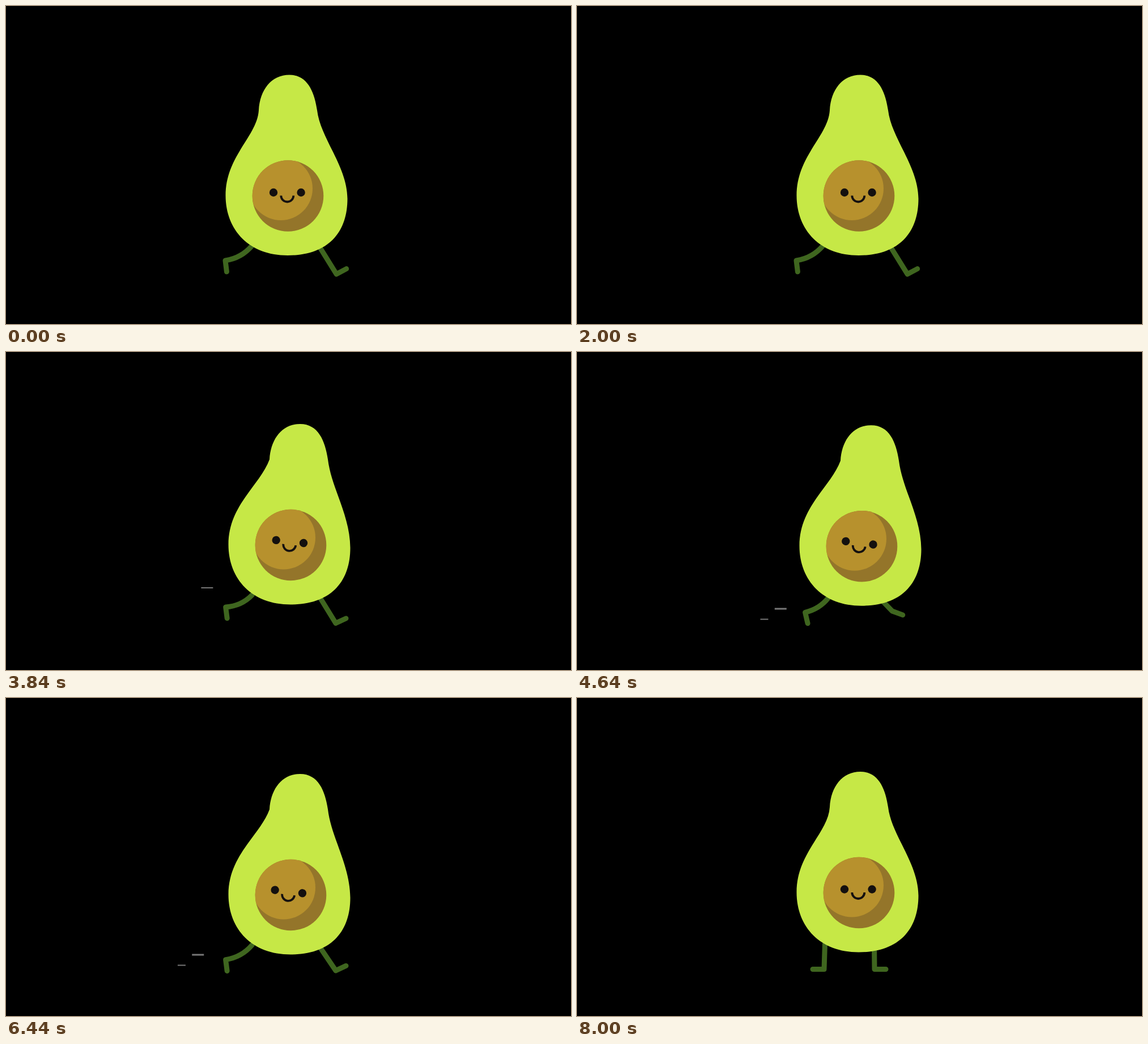
Write an HTML page that moves like this. It is 997x561 px and loops after 8040 ms.

```html
<!DOCTYPE html>
<html lang="en">
<head>
<meta charset="utf-8">
<title>Running avocado</title>
<style>
  html, body { margin: 0; width: 100%; height: 100%; overflow: hidden; background: #000; }
  svg { display: block; width: 100vw; height: 100vh; }
  .leg { fill: none; stroke: #3f661f; stroke-width: 9; stroke-linecap: round; stroke-linejoin: round; }
  .dash { stroke: #777; }
</style>
</head>
<body>
<svg viewBox="0 0 997 561">
  <defs>
    <clipPath id="seedClip"><circle cx="497.5" cy="335" r="62.8"/></clipPath>
  </defs>
  <line class="dash" stroke-width="2"/>
  <line class="dash" stroke-width="3"/>
  <line class="dash" stroke-width="2"/>
  <g id="avocado">
    <path class="leg"/>
    <path class="leg"/>
    <path id="body" fill="#c6e846"/>
    <g id="seed">
      <circle cx="497.5" cy="335" r="62.8" fill="#94752a"/>
      <circle cx="485" cy="322" r="56" fill="#b7912d" clip-path="url(#seedClip)"/>
      <g id="face" fill="#14100f">
        <circle cx="-24.3" r="7.2"/>
        <circle cx="24.3" r="7.2"/>
        <path d="M-11 5.5A11 11 0 0 0 11 5.5" fill="none" stroke="#14100f" stroke-width="3.8"/>
      </g>
    </g>
  </g>
</svg>
<script>
const LOOP = 8040, FRAME = 40;
const HOP = 500, HOP_LEAD = 32;
const RUN_START = 2968, RUN_END = 7960;
const STRIDE = 14000 / 24, REACH_AT = 5869;
const BOB = 1000 / 3, LOW_AT = 3063;

// Speed lines: y, length, start within a stride
const DASHES = [[416, 21, -.28], [453, 21, .11], [471.5, 14, -.01]];

const $ = s => document.querySelector(s);
const legs = document.querySelectorAll('.leg');
const dashes = document.querySelectorAll('.dash');
const avocado = $('#avocado'), body = $('#body'), seed = $('#seed'), face = $('#face');

const { PI, sin, cos, max, min } = Math;
const mod = (a, n) => ((a % n) + n) % n;
const clamp = x => max(0, min(1, x));
const smooth = x => x * x * (3 - 2 * x);
const mix = (a, b, k) => a.map((v, i) => v + (b[i] - v) * k);

// A leg is hip x y, heel x y, foot angle, bend.
const standLeg = side => [
  481 + 43.5 * side, 425, 480.5 + 44.5 * side, 470, 90 - 90 * side, 0
];

// Angle 0 reaches furthest forward, PI furthest back.
function strideLeg(angle) {
  const c = cos(angle), s = sin(angle);
  const sway = c - .15 * s * s;
  const lift = 34 * max(0, -s);
  return [
    493 + 59 * sway, 434 - 11 * sway * sway,
    485 + 98 * sway, 461 + 12 * c - lift,
    55 - 28 * c - 55 * max(0, c) ** 6,
    -10 * max(0, -sway)
  ];
}

function legPath([hx, hy, ax, ay, angle, bend]) {
  const dx = ax - hx, dy = ay - hy, len = Math.hypot(dx, dy) || 1;
  const cx = (hx + ax) / 2 - dy / len * bend;
  const cy = (hy + ay) / 2 + dx / len * bend;
  const turn = angle * PI / 180;
  return `M${hx} ${hy}Q${cx} ${cy} ${ax} ${ay}l${20 * cos(turn)} ${20 * sin(turn)}`;
}

// Leaning pushes the head further than the belly
function bodyPath(lean) {
  const h = (x, y) => `${x + 19 * lean} ${y} `;
  const b = (x, y) => `${x + 5 * lean} ${y} `;
  return 'M' + h(500, 121.5) +
    'C' + h(532, 121.5) + h(544, 151) + h(549, 184) +
    'C' + h(555, 234) + b(602, 282) + b(602.5, 340) +
    'C' + b(602.5, 398) + b(570, 440) + b(497, 440) +
    'C' + b(430, 440) + b(387.5, 396) + b(387.5, 334) +
    'C' + b(387.5, 265) + b(443, 230) + h(446, 184) +
    'C' + h(448, 148) + h(468, 121.5) + h(500, 121.5) + 'Z';
}

const standPose = () => ({ y: 8.5, lean: 0, look: -1.2, tilt: 0, legs: [standLeg(-1), standLeg(1)] });

// Legs split at take-off and close on landing
function hopPose(t) {
  const s = mod(t + HOP_LEAD, HOP) / HOP;
  const open = clamp(min(s / .064, (1 - s) / .08));
  const pose = standPose();
  pose.y -= 142 * s * (1 - s);
  pose.legs = pose.legs.map((leg, i) => mix(leg, strideLeg(PI * (1 - i)), open));
  return pose;
}

function runPose(t) {
  const angle = 2 * PI * (t - REACH_AT) / STRIDE;
  const lean = smooth(clamp((t - RUN_START) / 90));
  const glance = sin(PI * (t - RUN_START) / (RUN_END - RUN_START));
  return {
    y: 8.4 + 6 * cos(2 * PI * (t - LOW_AT) / BOB),
    lean,
    look: 2 - 7 * glance,
    tilt: (5 + 2 * glance) * lean,
    legs: [strideLeg(angle), strideLeg(angle + PI)]
  };
}

function poseAt(t) {
  if (t < RUN_START) return hopPose(t);
  return t < RUN_END ? runPose(t) : standPose();
}

function drawDashes(t) {
  const cycle = (t - REACH_AT) / STRIDE + .324;
  const running = t > RUN_START + 100 && t < RUN_END;
  DASHES.forEach(([y, len, start], i) => {
    const age = mod(cycle - start, 1), x = 385 - 240 * age;
    const half = len / 2 * clamp(age / .06);
    const ends = { x1: x - half, x2: x + half, y1: y, y2: y };
    for (const key in ends) dashes[i].setAttribute(key, ends[key]);
    dashes[i].style.display = running && age < .36 ? '' : 'none';
  });
}

function draw(now) {
  const t = Math.floor(mod(now, LOOP) / FRAME) * FRAME;
  const p = poseAt(t);
  avocado.setAttribute('transform', `translate(0 ${p.y})`);
  legs.forEach((el, i) => el.setAttribute('d', legPath(p.legs[i])));
  body.setAttribute('d', bodyPath(p.lean));
  seed.setAttribute('transform', `translate(${5 * p.lean} 0)`);
  face.setAttribute('transform', `translate(${497.5 + p.look} 329) rotate(${p.tilt})`);
  drawDashes(t);
}

const begin = performance.now();
function tick() {
  draw(performance.now() - begin);
  requestAnimationFrame(tick);
}
tick();
</script>
</body>
</html>
```
